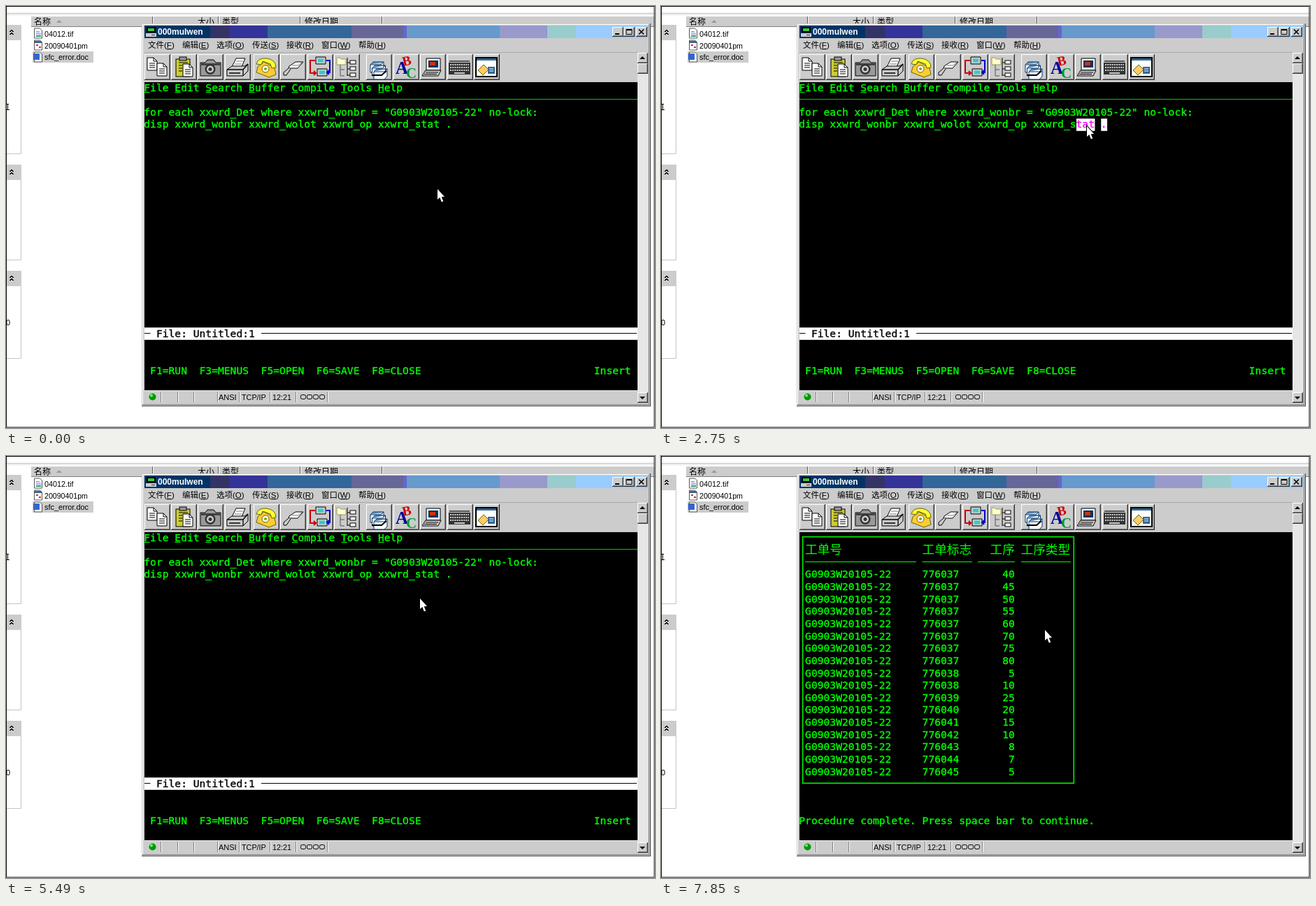
These frames come from a looping animation (928x604 px, 8 s). An HTML page:

```html
<!DOCTYPE html>
<html lang="zh">
<head>
<meta charset="utf-8">
<title>Terminal query</title>
<style>
html, body { margin: 0; width: 100%; height: 100%; overflow: hidden; background: #fff; }
svg { display: block; width: 928px; height: 604px; }
text { white-space: pre; }
.ui { font-family: "Liberation Sans", "Noto Sans CJK SC", "Noto Sans CJK", sans-serif; }
.term { font-family: "DejaVu Sans Mono", monospace; fill: #0f0; stroke: #0f0; stroke-width: .35; }
.term .cjk { font-family: "Noto Sans CJK SC", "Noto Sans CJK", sans-serif; stroke: none; }
.term .ink { fill: #000; stroke: #000; }
.invert rect { fill: #fff; mix-blend-mode: difference; }
</style>
</head>
<body>
<svg id="stage" viewBox="0 0 928 604"></svg>
<script>
const LOOP = 8000;
const X0 = 197.3, Y0 = 108.6, CW = 8.815, RH = 17.63;
const GRAY = '#ccc', LITE = '#fff', DARK = '#808080', BLACK = '#000', GREEN = '#0f0';

const range = n => [...Array(n).keys()];
const rect = (x, y, w, h, fill, more = '') =>
  `<rect x="${x}" y="${y}" width="${w}" height="${h}" fill="${fill}" ${more}/>`;
const path = (d, stroke = BLACK, fill = 'none', width = 1) =>
  `<path d="${d}" stroke="${stroke}" fill="${fill}" stroke-width="${width}"/>`;
const label = (x, y, s, size, more = '') =>
  `<text class="ui" x="${x}" y="${y}" font-size="${size}" ${more}>${s}</text>`;
const move = (x, y, body) => `<g transform="translate(${x} ${y})">${body}</g>`;

// raised 3D box
const bevel = (x, y, w, h) =>
  rect(x, y, w, h, '#333') + rect(x, y, w - 1, h - 1, LITE) +
  rect(x + 1, y + 1, w - 2, h - 2, DARK) + rect(x + 1, y + 1, w - 3, h - 3, GRAY);

// terminal text at a character cell
const cell = (col, row, s, cls = '') =>
  `<text class="${cls}" x="${X0 + col * CW}" y="${Y0 + row * RH + 13}" font-size="${CW / .60205}">${s}</text>`;

function sidePanel(y, bottom) {
  const chevron = dy => path(`M5 ${y + dy}l3-3 3 3M6 ${y + dy}l2-2 2 2`);
  return rect(1, y, 21, 22, GRAY) + chevron(10) + chevron(14) +
    path(`M1 ${bottom - .5}H21.5V${y + 22}`, '#c4c4c4');
}

function explorer() {
  const sheet = y => path(`M40.5 ${y}h8l3 3v11h-11z`, '#555', LITE);
  const separators = [210, 304, 421, 538]
    .map(x => path(`M${x - .5} 15V27`, '#555') + path(`M${x + .5} 15V27`, LITE)).join('');
  return rect(0, 0, 928, 604, LITE) +
    rect(1, 10, 926, 1, '#bbb') + rect(1, 12, 926, 1, '#ddd') +
    rect(36, 14, 891, 16, GRAY) + rect(36, 14, 891, 1, LITE) + rect(36, 29, 891, 1, DARK) + separators +
    label(40, 27, '名称', 12) + path('M72 24l4-4 4 4z', 'none', '#999') +
    label(274, 27, '大小', 12) + label(309, 27, '类型', 12) + label(427, 27, '修改日期', 12) +
    sidePanel(27, 212) + sidePanel(227, 364) + sidePanel(379, 505) +
    path('M0 140.5h4M0 148.5h5M2.5 140v8') + label(0, 457, '0', 11) +
    sheet(32) + path('M43 37h5M43 40h7', '#36c') + path('M43 43h7', '#396', 'none', 2) +
    sheet(49) + rect(41, 50, 10, 3, '#369') + path('M43 56h3M47 59h3', '#c33', 'none', 2) +
    rect(38, 65, 87, 16, GRAY) + sheet(66) + rect(39, 68, 9, 9, '#36c') +
    label(55, 44, '04012.tif', 10.8) + label(55, 61, '20090401pm', 10.6) + label(55, 77, 'sfc_error.doc', 10.9);
}

const page = (x, y, fill = LITE) =>
  path(`M${x} ${y}h9l5 5v13h-14z`, BLACK, fill) + path(`M${x + 9} ${y}v5h5M${x + 3} ${y + 8}h8m-8 3h8m-8 3h8`);
const card = (x, y) => path(`M${x} ${y}h15l4-4v11l-4 4h-15z`, '#036', LITE) + path(`M${x} ${y}l4-4h15`, '#036', '#69c');
const screen = (x, y, fill) =>
  path(`M${x} ${y}h14v10h-14z`, BLACK, GRAY) + rect(x + 3, y + 2.5, 8, 5, fill);
const letter = (x, y, s, fill, size, turn = 0) =>
  `<text x="${x}" y="${y}" font-family="Liberation Serif, serif" font-weight="bold" font-size="${size}" fill="${fill}" transform="rotate(${turn} ${x} ${y})">${s}</text>`;

// toolbar pictures, each in a 36 x 36 box
const ICONS = [
  page(4, 5) + page(18, 13),
  rect(7, 7, 20, 25, '#cc3', 'stroke="#000"') + rect(12, 4, 10, 5, '#999', 'stroke="#000"') +
    path('M11 12h13m-13 4h5m-5 4h5m-5 4h5') + page(17, 14),
  path('M4 12h7l3-4h9l3 4h7v19h-29z', BLACK, '#999') + rect(5, 13, 27, 3, '#444') +
    '<circle cx="18" cy="21.5" r="7.5" fill="#333"/><circle cx="18" cy="21.5" r="5" fill="#ccc"/><circle cx="18" cy="21.5" r="2.5" fill="#333"/>',
  path('M10 18l6-12h13l-5 12z', BLACK, LITE) + path('M14 14h10m-8-4h10', '#777') +
    path('M3 22l7-5h18l5-3v10l-7 7h-23z', BLACK, GRAY) + path('M3 22h23l7-8M26 22v9M6 27h16', BLACK, 'none', 1.3),
  path('M6 18l9-7 15 9 2 9-10 4-18-7z', '#660', '#fc3') +
    path('M4 14q2-9 15-8 13 2 13 13l-6 1-2-6-11-4-2 5z', '#660', '#ff3') +
    '<circle cx="17" cy="21" r="5" fill="#fff" stroke="#660"/><circle cx="17" cy="21" r="2" fill="#990"/>',
  path('M13 17l9-6h11l-8 9h-13z', BLACK, LITE) + path('M17 16h9l5-4', '#777') + path('M12 20l-7 6v4h4l6-9', BLACK, GRAY),
  screen(12, 4, '#3cc') + screen(14, 21, '#3cc') + path('M11 9H4v18h8m-3-3 3 3-3 3', '#c00', 'none', 2) +
    path('M27 9h5v17h-3m2-3-3 3 3 3', '#00c', 'none', 2),
  path('M4 5h4l2 2h7v8h-13z', '#996', '#ffc') + path('M9 15v16h6M9 22h6', '#555') +
    path('M19 5v26M19 12h4m-4 9h4m-4 9h4') + [9, 18, 27].map(y => rect(23, y, 8, 5, LITE, 'stroke="#000"')).join(''),
  [0, 5, 10].map(d => card(6 + (10 - d) / 2, 23 - d + 2)).reverse().join('') + path('M8 30h14l7-6', BLACK, 'none', 2),
  letter(3, 28, 'A', '#009', 25) + letter(14, 17, 'B', '#c00', 19, -12) + letter(18, 34, 'C', '#093', 21),
  path('M9 6h20v17h-20z', BLACK, '#eee') + rect(12, 9, 14, 10, '#036') + rect(14, 11, 8, 5, '#c30') +
    path('M8 23h22l-4 8h-23z', BLACK, GRAY) + path('M8 26h18m-20 2.500h18', BLACK, 'none', 1.2),
  rect(2, 12, 31, 17, '#333') + rect(3, 9, 29, 2, '#555') +
    [15, 19, 23].map(y => path(`M4 ${y}h27`, GRAY, 'none', 2).replace('/>', ' stroke-dasharray="2 1.200"/>')).join('') +
    path('M10 27h15', GRAY, 'none', 2),
  rect(3, 5, 30, 27, LITE, 'stroke="#000" stroke-width="2"') + rect(4, 6, 28, 3, '#369') +
    path('M6 23l8-8 7 7-8 8z', '#660', '#fc6') + rect(20, 18, 10, 10, '#369') + path('M22 21h6m-6 3h6', LITE)
];
const ICON_X = [198, 236, 274, 313, 354, 392, 431, 469, 515, 554, 592, 631, 669];

function titleBar() {
  const bands = [[198, '#036'], [292, '#336'], [320, '#339'], [374, '#369'], [494, '#669'],
    [568, '#66c'], [573, '#69c'], [706, '#99c'], [774, '#9cc'], [815, '#9cf']];
  return bands.map(([x, fill]) => rect(x, 28, 918 - x, 18, fill)).join('') +
    rect(201, 30, 13, 8, BLACK) + rect(203, 32, 9, 4, '#3c3') + rect(200, 39, 15, 5, GRAY) + rect(208, 41, 5, 1, '#333') +
    label(217, 41, '000mulwen', 12, 'font-weight="bold" fill="#fff"') +
    [867, 883, 901].map(x => bevel(x, 30, 16, 14)).join('') +
    rect(871, 39, 6, 2, BLACK) + path('M887 33.500h8v7h-8zM887 34.500h8') +
    path('M905 33.500l7 7m0-7l-7 7', BLACK, 'none', 1.6);
}

function menuBar() {
  const items = [[203, '文件', 'F'], [252, '编辑', 'E'], [301, '选项', 'O'], [352, '传送', 'S'],
    [401, '接收', 'R'], [451, '窗口', 'W'], [504, '帮助', 'H']];
  return items.map(([x, s, key]) =>
    label(x, 60, `${s}(<tspan text-decoration="underline">${key}</tspan>)`, 11.5)).join('');
}

function scrollBar() {
  return rect(903, 67, 15, 501, '#e6e6e6') + bevel(903, 67, 15, 15) + bevel(903, 82, 15, 15) + bevel(903, 553, 15, 15) +
    path('M906 76h8l-4-4z', 'none', BLACK) + path('M906 559h8l-4 4z', 'none', BLACK);
}

function statusBar() {
  const marks = [222, 246, 269, 303, 334, 378, 415, 460];
  return rect(198, 550, 705, 1, '#eee') +
    marks.map(x => path(`M${x - .5} 552V567`, DARK) + path(`M${x + .5} 552V567`, LITE)).join('') +
    '<circle cx="209.500" cy="559.500" r="5" fill="#090"/><circle cx="208" cy="557.500" r="2" fill="#6f6"/>' +
    label(304, 563.5, 'ANSI', 11) + label(337, 563.5, 'TCP/IP', 10.8) + label(381, 563.5, '12:21', 10.8) +
    range(4).map(i => rect(421.5 + i * 9, 556.5, 7, 6, 'none', 'stroke="#000" rx="2"')).join('');
}

function appWindow() {
  return rect(194, 25, 728, 548, '#444') + rect(194, 25, 727, 547, GRAY) + rect(195, 26, 725, 1, LITE) +
    rect(195, 26, 1, 545, LITE) + rect(919, 26, 1, 545, DARK) + rect(195, 570, 725, 1, DARK) +
    titleBar() + menuBar() + rect(198, 66, 705, 1, '#aaa') +
    ICONS.map((icon, i) => bevel(ICON_X[i], 69, 37, 37) + move(ICON_X[i], 69, icon)).join('') +
    scrollBar() + statusBar() + rect(198, 109, 705, 441, BLACK);
}

function editorView() {
  const bar = Y0 + 20 * RH;
  return cell(0, 0, 'File Edit Search Buffer Compile Tools Help') +
    [0, 5, 10, 17, 24, 32, 38].map(c => rect(X0 + c * CW, 123, CW - .5, 1, GREEN, 'stroke="none"')).join('') +
    path('M198 133.500H903', '#00c800') +
    cell(0, 2, 'for each xxwrd_Det where xxwrd_wonbr = "G0903W20105-22" no-lock:') +
    cell(0, 3, 'disp xxwrd_wonbr xxwrd_wolot xxwrd_op xxwrd_stat .') +
    rect(198, bar - 1, 705, RH, LITE, 'stroke="none"') + path('M198 468.500h8.500M365 468.500H902') +
    cell(2, 20, 'File: Untitled:1', 'ink') +
    cell(1, 23, 'F1=RUN  F3=MENUS  F5=OPEN  F6=SAVE  F8=CLOSE') + cell(73, 23, 'Insert');
}

function tableView() {
  const heads = [[1, '工单号'], [20, '工单标志'], [31, '工序'], [36, '工序类型']];
  const ops = [40, 45, 50, 55, 60, 70, 75, 80, 5, 10, 25, 20, 15, 10, 8, 7, 5];
  const lot = i => 776037 + Math.max(0, i < 9 ? Math.floor(i / 8) : i - 8);
  return rect(202.7, 115.7, 387.6, 352.6, 'none', 'stroke="#0f0" stroke-width="1.500"') +
    heads.map(([c, s]) =>
      `<text class="cjk" x="${X0 + c * CW}" y="${Y0 + RH + 13.5}" font-size="${2 * CW}">${s}</text>`).join('') +
    path('M206 151.500H365M373.500 151.500H445M453 151.500H506M515 151.500H586', GREEN) +
    ops.map((op, i) => cell(1, i + 3, 'G0903W20105-22') + cell(20, i + 3, lot(i)) +
      cell(33, i + 3, String(op).padStart(2))).join('');
}

const stage = document.getElementById('stage');
stage.innerHTML = explorer() + appWindow() +
  `<g class="term" id="editor">${editorView()}</g>` +
  `<g class="term" id="table">${tableView()}<g id="done">${cell(0, 23, 'Procedure complete. Press space bar to continue.')}</g></g>` +
  `<g class="invert"><rect id="caret" width="${CW}" height="${RH}"/><rect id="mark" height="${RH}" y="${Y0 + 3 * RH - .3}"/></g>` +
  '<path id="mouse" d="M0 0V15L3.300 12 5.800 18.500 8.300 17.400 5.700 11.300 10 11z" fill="#fff" stroke="#000" stroke-width="2" paint-order="stroke"/>' +
  rect(.5, .5, 926.5, 602.5, 'none', 'stroke="#000"');

const part = Object.fromEntries(['editor', 'table', 'done', 'caret', 'mark', 'mouse']
  .map(id => [id, document.getElementById(id)]));
const show = (node, on) => node.setAttribute('visibility', on ? 'inherit' : 'hidden');
const place = (node, attrs) => Object.entries(attrs).forEach(([k, v]) => node.setAttribute(k, v));

// time, x, y of the pointer; it jumps from one to the next
const POINTER = [
  [0, 617, 262], [850, 616.5, 262], [1170, 610, 203], [1270, 610, 160], [1380, 611, 130], [1480, 614, 136],
  [1590, 619, 148], [1690, 623, 160], [1800, 626, 168], [1900, 627, 172], [2000, 626, 172], [2430, 625, 173],
  [2750, 609, 172], [2850, 600, 172], [2960, 591, 172], [3060, 582, 172], [3170, 573, 173], [3270, 565, 173],
  [3380, 558, 173], [3480, 554, 173], [3680, 553, 174], [4430, 560, 181], [4530, 570, 190], [4640, 580, 198],
  [4740, 588, 202], [4850, 591, 203], [4950, 592, 204], [7850, 549, 249]
];
const CARET_FLIPS = [100, 420, 1380, 1800, 2110, 3790, 4000, 4430, 4950, 5490, 6030, 6340, 6880, 7310];
const QUERY_DONE = 6030, MESSAGE = 6130, DRAG = 2750, RELEASE = 4430;

function draw(t) {
  const [, x, y] = POINTER.filter(p => p[0] <= t).pop();
  part.mouse.setAttribute('transform', `translate(${x} ${y})`);

  const inTable = t >= QUERY_DONE;
  show(part.editor, !inTable);
  show(part.table, inTable);
  show(part.done, t >= MESSAGE);

  const [col, row] = inTable ? [78, 23] : [49, 3];
  place(part.caret, { x: X0 + col * CW, y: Y0 + row * RH - .3 });
  show(part.caret, CARET_FLIPS.filter(f => f <= t).length % 2);

  const dragging = t >= DRAG && t < RELEASE;
  const from = Math.min(47, Math.floor((x - X0) / CW) - 1);
  place(part.mark, { x: X0 + from * CW, width: (48 - from) * CW });
  show(part.mark, dragging);
}

const start = performance.now();
function tick() {
  draw((performance.now() - start) % LOOP);
  requestAnimationFrame(tick);
}
tick();
</script>
</body>
</html>
```
